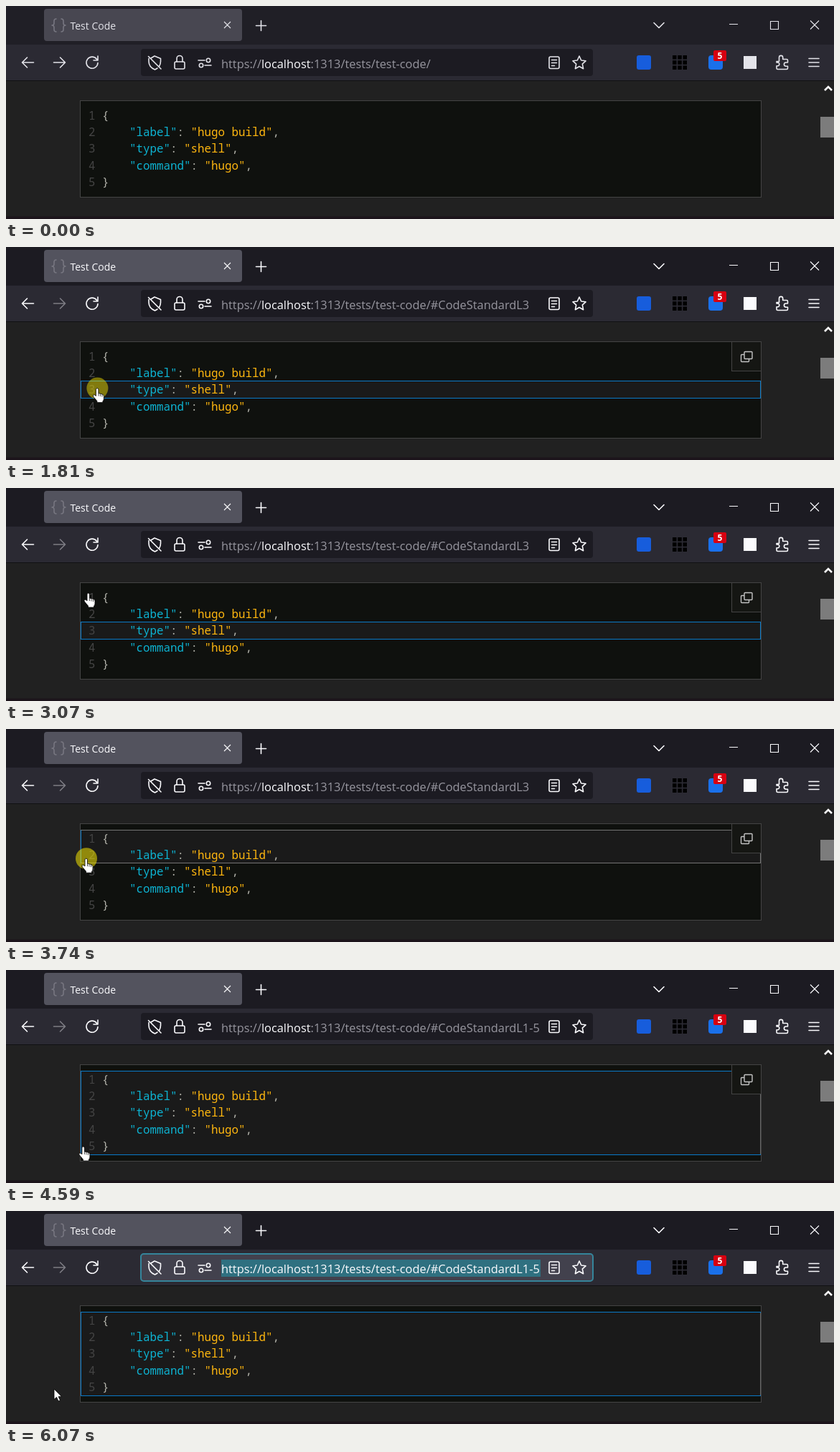
Animation, 1154 px wide and 298 px high, one loop 8.69 s. Source, as an HTML page:

```html
<!DOCTYPE html>
<html lang="en">
<head>
<meta charset="utf-8">
<title>Line selection demo</title>
<style>
html, body { margin: 0; width: 100%; height: 100%; overflow: hidden; background: #212121; }
svg { display: block; width: 1154px; height: 298px; --bar: #201f26; --tab: #484751; --ink: #e4e4ea; --muted: #97969f; }
svg.active { --bar: #1c1b22; --tab: #53535e; --ink: #fbfbfe; }
text { font-family: "Open Sans", "Noto Sans", sans-serif; white-space: pre; }
.line { fill: none; stroke: var(--ink); stroke-width: 1.6; stroke-linecap: round; stroke-linejoin: round; }
.thin { stroke-width: 1.1; stroke-linecap: butt; stroke-linejoin: miter; }
.url { font-size: 16.4px; fill: var(--muted); }
.host { fill: #fbfbfe; }
.field { fill: #1c1b22; stroke: none; stroke-width: 2; }
.focused .field { fill: #42414d; stroke: #35859b; }
.focused .url { fill: #fbfbfe; }
.selection { fill: #2f7080; visibility: hidden; }
.focused .selection { visibility: visible; }
.visited #forward { opacity: .4; }
.code text { font: 15.83px "Noto Sans Mono", "DejaVu Sans Mono", monospace; fill: #b2b2aa; }
.code .number { fill: #444; }
.key { fill: #0db4d3; }
.string { fill: #ffb70f; }
#range { fill: #1a1a1a; stroke: #0a7ac8; }
.dragging #range { stroke: #747474; }
.edge { fill: none; stroke: #0a7ac8; }
#rightEdge { stroke: #656565; }
.pointer { fill: #fff; stroke: #000; stroke-width: .8; stroke-linejoin: round; }
</style>
</head>
<body>
<svg id="stage" viewBox="0 0 1154 298">
  <!-- Tab strip -->
  <rect width="1154" height="54" fill="var(--bar)"/>
  <rect x="53" y="4" width="276" height="45" rx="4" fill="var(--tab)"/>
  <path class="line" style="stroke:#777680" d="M70 18q-3 0-3 3v3q0 3-3 3 3 0 3 3v3q0 3 3 3M77 18q3 0 3 3v3q0 3 3 3-3 0-3 3v3q0 3-3 3"/>
  <text x="89.500" y="32.500" font-size="14" fill="var(--ink)">Test Code</text>
  <path class="line thin" d="M304 22l9 9m0-9l-9 9M1008 25.500h12M1065.500 21.500h11v11h-11zM1121 20.500l12 12m0-12l-12 12"/>
  <path class="line" d="M348.500 27.500h14m-7-7v14M903 23.500l7 7 7-7"/>

  <!-- Toolbar -->
  <rect y="54" width="1154" height="50" fill="#2b2a33"/>
  <rect y="104" width="1154" height="1" fill="#101013"/>
  <path class="line" d="M38.500 79h-16m7-7l-7 7 7 7"/>
  <path class="line" id="forward" d="M66.500 79h16m-7-7l7 7-7 7"/>
  <path class="line" d="M126.500 74.500a8 8 0 1 0 1.500 5M128 70v6h-6"/>
  <rect class="field" x="188" y="60" width="630" height="38" rx="4"/>
  <rect class="selection" x="300" y="68" width="445" height="24"/>
  <g class="line">
    <path d="M202 73l5-3 8.500 3.500v4q0 4-2 7M199 73.500v4q0 8 8.500 11.500 2-1 3.500-2M198.500 70.500l17.500 17.500"/>
    <path d="M238 78v-4.500a4 4 0 0 1 8 0V78"/>
    <rect x="235" y="78" width="14" height="10" rx="2"/>
    <path d="M268 76h9M277 83h9"/>
    <circle cx="282" cy="76" r="2.700"/><circle cx="272" cy="83" r="2.700"/>
    <rect x="757" y="71" width="14" height="16.500" rx="2"/>
    <path d="M760.500 75.500h7m-7 4h7m-7 4h4"/>
    <path d="M799 70l2.700 6 6.300.8-4.700 4.400 1.300 6.500-5.600-3.200-5.600 3.200 1.300-6.500-4.700-4.400 6.300-.8z"/>
    <path d="M1074 77.500h3.500v-5.500a2.600 2.600 0 0 1 5.200 0v2.500h5.300q1.500 0 1.500 1.500v3h-2.500a2.600 2.600 0 0 0 0 5.200h2.500v2.800q0 1.500-1.500 1.500h-12.500q-1.500 0-1.500-1.500v-3.300h2.200a2.500 2.500 0 0 0 0-4.700h-2.200z"/>
    <path d="M1119 73.500h14m-14 5.500h14m-14 5.500h14"/>
  </g>
  <text class="url" x="300" y="86.500"><tspan>https://</tspan><tspan class="host">localhost</tspan><tspan>:1313/tests/test-code/</tspan><tspan id="hash"></tspan></text>
  <rect x="879" y="69" width="20" height="20" rx="3" fill="#175ddc"/>
  <path stroke="#000" stroke-width="5.500" stroke-dasharray="5.500 1.750" d="M929 71.750h20m-20 7.250h20m-20 7.250h20"/>
  <rect x="979" y="69" width="20" height="20" rx="4" fill="#1a70ea"/>
  <rect x="986" y="62" width="18" height="15" rx="2" fill="#d70010"/>
  <text x="995" y="74" font-size="12" font-weight="700" fill="#fff" text-anchor="middle">5</text>
  <rect x="1028" y="70" width="18" height="18" fill="var(--ink)"/>

  <!-- Page -->
  <rect y="105" width="1154" height="193" fill="#212121"/>
  <rect y="294.500" width="1154" height="3.500" fill="#1c141b"/>
  <path class="line" style="stroke:#fff;stroke-width:2.600;stroke-linecap:butt;stroke-linejoin:miter" d="M1141 118l5-5 5 5"/>
  <rect x="1135" y="155" width="19" height="29" fill="#7c7c7c"/>
  <rect x="103.500" y="132.500" width="949" height="135" fill="#0f110e" stroke="#444"/>
  <rect id="range" x="104.500" width="947"/>
  <path id="leftEdge" class="edge"/>
  <path id="rightEdge" class="edge"/>
  <g class="code" id="code"></g>
  <g id="copy">
    <rect x="1011.500" y="132.500" width="41" height="41" fill="#151613" stroke="#444"/>
    <path class="line" style="stroke:#c4c4c4;stroke-width:1.400" d="M1030 146.500h9q1 0 1 1v8q0 1-1 1h-9q-1 0-1-1v-8q0-1 1-1zM1029 150.500h-3.500q-1 0-1 1v8q0 1 1 1h9q1 0 1-1v-3"/>
  </g>

  <g id="cursor">
    <circle id="press" r="15" fill="#fff000"/>
    <path id="arrow" class="pointer" d="M0 0V14.500L3.500 11.500 6 17 8.500 16 6.200 10.700H10.500Z"/>
    <g id="hand">
      <path class="pointer" d="M-2 2q0-2 1.700-2t1.800 2v5l5 1.200q2.500.7 2.500 3v3.500q0 2-1.500 3.500v1.800h-8v-2l-5-6q-1.300-2 .3-2.800 1.200-.6 3.200 1.600z"/>
      <path stroke="#000" stroke-width=".7" d="M1.500 7v4M4 8v3.500M6.500 8.500v3.500"/>
    </g>
  </g>
</svg>
<script>
const LOOP = 8690;
const CLICK = { down: 1680, up: 1780 };
const DRAG = { down: 3540, up: 4340 };
const FOCUS = 6070;
const FADE = 240;

// time, x, y of the pointer tip
const PATH = [
  [890, 97, 296], [1250, 118, 207], [1370, 127, 198], [1539, 127, 198],
  [1540, 128, 197], [2000, 127, 198], [2440, 97, 175], [2530, 98, 164],
  [3070, 115, 147], [3540, 115, 147], [3740, 112, 181], [4070, 112, 241],
  [4340, 112, 241], [4590, 108, 247], [5030, 67, 249]
];

const LINES = [
  "{", '    "label": "hugo build",', '    "type": "shell",', '    "command": "hugo",', "}"
];

const el = id => document.getElementById(id);
const show = (node, on) => node.setAttribute("visibility", on ? "visible" : "hidden");
const rowTop = row => Math.floor(141 + 23.4 * row) + 0.5;
const rowAt = y => Math.max(1, Math.min(5, Math.floor((y - 141) / 23.4) + 1));

const paint = line => line
  .replace(/("[^"]*")(:?)/g, (_, word, colon) =>
    `<tspan class="${colon ? "key" : "string"}">${word}</tspan>${colon}`);

el("code").innerHTML = LINES.map((line, i) => {
  const y = 158.7 + 23.3 * i;
  return `<text class="number" x="115" y="${y}">${i + 1}</text><text x="134" y="${y}">${paint(line)}</text>`;
}).join("");

function pointerAt(t) {
  const next = PATH.findIndex(p => p[0] > t);
  if (next < 0) return PATH[PATH.length - 1].slice(1);
  if (next === 0) return [-50, 400];
  const [t0, x0, y0] = PATH[next - 1], [t1, x1, y1] = PATH[next];
  const k = (t - t0) / (t1 - t0);
  return [x0 + (x1 - x0) * k, y0 + (y1 - y0) * k];
}

function pressStrength(t, { down, up }) {
  if (t < down) return 0;
  return t < up ? 1 : Math.max(0, 1 - (t - up) / FADE);
}

function selectedRows(t, y) {
  if (t < CLICK.up) return null;
  if (t < DRAG.down) return [3, 3];
  return [1, t < DRAG.up ? rowAt(y) : 5];
}

function drawRange(rows, finished) {
  show(el("range"), rows);
  show(el("leftEdge"), rows);
  show(el("rightEdge"), rows && finished);
  if (!rows) return;
  const top = rowTop(rows[0] - 1), bottom = rowTop(rows[1]);
  el("range").setAttribute("y", top);
  el("range").setAttribute("height", bottom - top);
  el("leftEdge").setAttribute("d", `M104.5 ${top}V${bottom}`);
  el("rightEdge").setAttribute("d", `M1051.5 ${top + 1}V${bottom - 1}`);
}

function draw() {
  const t = performance.now() % LOOP;
  const [x, y] = pointerAt(t);
  const inside = x >= 104 && x <= 1052 && y >= 133 && y <= 267;
  const overNumber = inside && y >= 141 && y <= 259;

  const state = el("stage").classList;
  state.toggle("active", t >= CLICK.down);
  state.toggle("visited", t >= CLICK.up);
  state.toggle("dragging", t >= DRAG.down && t < DRAG.up);
  state.toggle("focused", t >= FOCUS);

  el("hash").textContent =
    t < CLICK.up ? "" : t < DRAG.up ? "#CodeStandardL3" : "#CodeStandardL1-5";
  drawRange(selectedRows(t, y), t >= DRAG.up);
  show(el("copy"), inside);
  show(el("hand"), overNumber);
  show(el("arrow"), !overNumber);
  el("cursor").setAttribute("transform", `translate(${x.toFixed(1)} ${y.toFixed(1)})`);
  el("press").setAttribute("opacity", 0.52 * Math.max(pressStrength(t, CLICK), pressStrength(t, DRAG)));
  requestAnimationFrame(draw);
}
draw();
</script>
</body>
</html>
```
